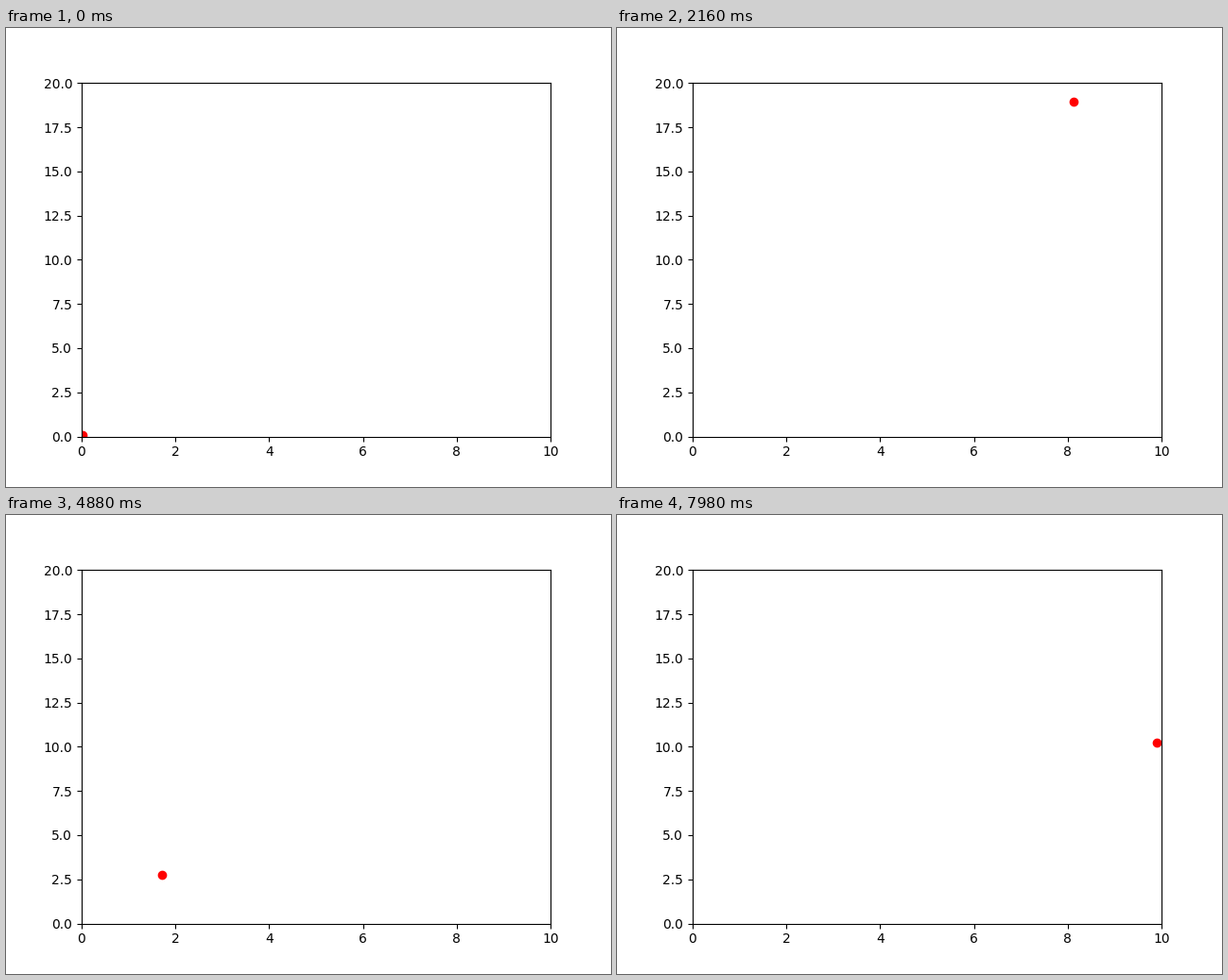
Write a matplotlib script that moves like this. It is 640 px wide and 486 px high and loops after 8000 ms.

```python
import matplotlib.pyplot as plt
from matplotlib.animation import FuncAnimation

FRAMES = 400
INTERVAL = 20            # ms
STEP_X, STEP_Y = 3, 7    # hundredths of a unit per simulation step
WALL_X, WALL_Y = 1002, 2002  # turning points: first step past 10 and 20


def bounce(distance, wall):
    """Fold a travelled distance (hundredths) back and forth between 0 and wall."""
    d = distance % (2 * wall)
    return min(d, 2 * wall - d) / 100


def position(frame):
    # Five simulation steps every two frames
    step = 5 * frame // 2 + 1
    return bounce(STEP_X * step, WALL_X), bounce(STEP_Y * step, WALL_Y)


fig, ax = plt.subplots(figsize=(6.4, 4.86), dpi=100)
ax.set_xlim(0, 10)
ax.set_ylim(0, 20)
ball, = ax.plot([], [], "ro")


def init():
    ball.set_data([], [])
    return ball,


def update(frame):
    x, y = position(frame)
    ball.set_data([x], [y])
    return ball,


anim = FuncAnimation(fig, update, frames=FRAMES, init_func=init,
                     interval=INTERVAL, repeat=True, repeat_delay=0)
plt.show()
```
